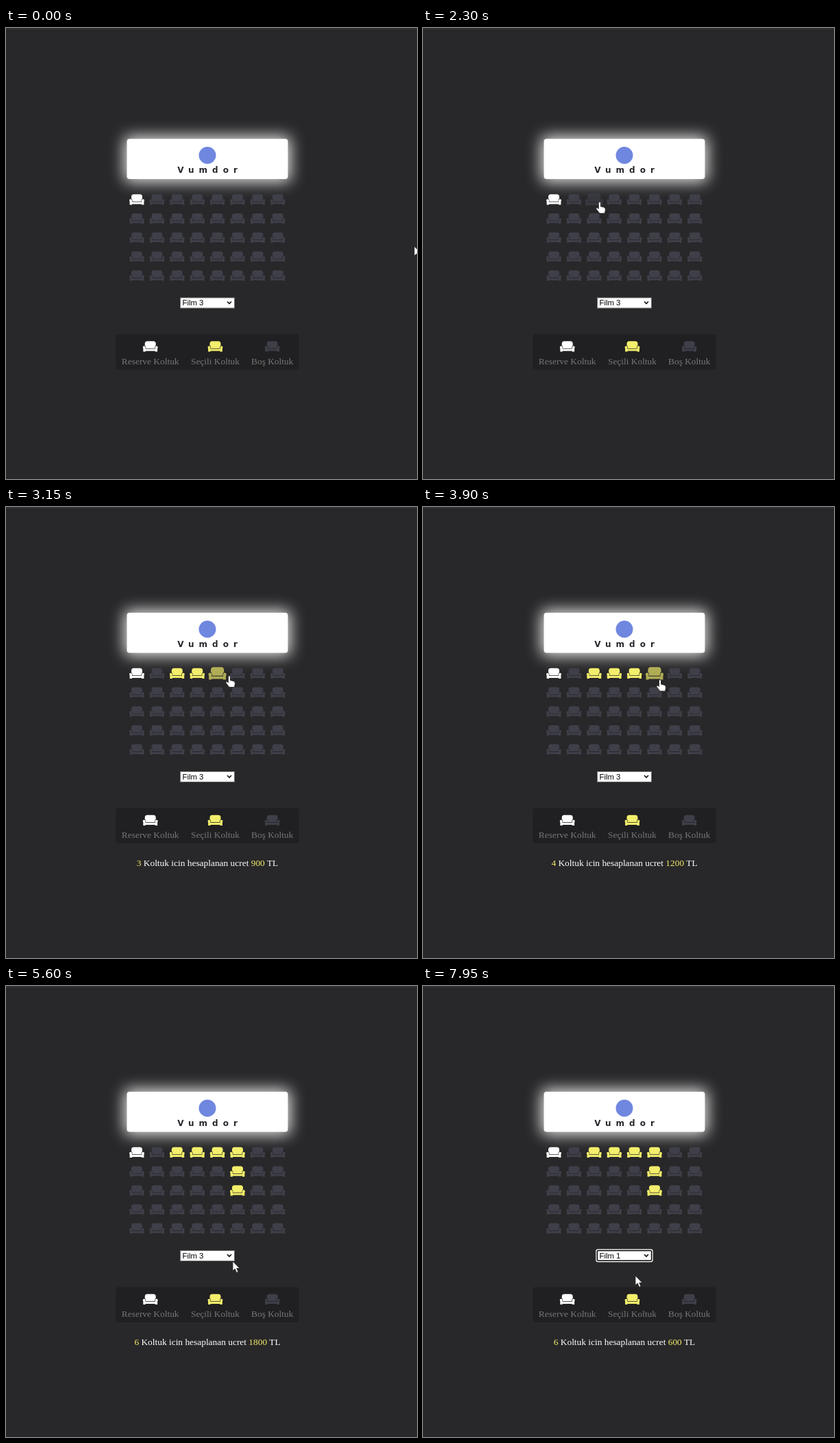
Animation, 600 px wide and 657 px high, one loop 8 s. Source, as an HTML page:

```html
<!DOCTYPE html>
<html lang="tr">
<head>
<meta charset="utf-8">
<style>
html, body { margin: 0; width: 100%; height: 100%; overflow: hidden; background: #282729; }
svg { display: block; }
.serif { font: 13.4px "Liberation Serif", serif; text-anchor: middle; }
.sans { font: 11.3px "Liberation Sans", sans-serif; }
.brand { font: bold 12px "DejaVu Sans", sans-serif; letter-spacing: 7px; text-anchor: middle; fill: #28272d; }
</style>
</head>
<body>
<svg width="600" height="657" viewBox="0 0 600 657">
  <defs>
    <filter id="glow" x="-30%" y="-100%" width="160%" height="300%"><feGaussianBlur stdDeviation="11"/></filter>
    <g id="seat">
      <path d="M3 6.5V4Q3 .3 6.5 .3H15.5Q19 .3 19 4V6.5Q17.6 7 17.6 9V10.8H4.4V9Q4.4 7 3 6.5Z"/>
      <path d="M0 9Q0 7.2 2 7.2T3.9 9V11.6H18.1V9Q18.1 7.2 20 7.2T22 9L21.4 11V15.5H18V14.6H4V15.5H.6V11Z"/>
    </g>
  </defs>
  <path d="M0 1.5H600" stroke="#38373a"/>
  <g id="page">
    <rect x="173" y="158" width="242" height="66" rx="6" fill="#fff" opacity=".9" filter="url(#glow)"/>
    <rect x="176.5" y="161.5" width="235" height="58.5" rx="4" fill="#fff"/>
    <circle cx="294" cy="185.5" r="12.5" fill="#7087e0"/>
    <text class="brand" x="297.5" y="211">Vumdor</text>
    <g id="seats"></g>
    <rect x="254.5" y="393" width="79" height="15" fill="#fff" stroke="#767676"/>
    <g id="focus" fill="none">
      <rect x="253" y="391.5" width="82" height="17.5" rx="2.5" stroke="#fff" stroke-width="1.5"/>
      <rect x="254.4" y="392.9" width="79.2" height="14.7" rx="1" stroke="#111" stroke-width="1.5"/>
    </g>
    <text id="film" class="sans" x="257.5" y="404"></text>
    <path d="M323 398.5L326 401.5L329 398.5" fill="none" stroke="#111" stroke-width="1.6"/>
    <rect x="160.5" y="446" width="267" height="51.5" rx="4" fill="#201f21"/>
    <g id="legend" class="serif"></g>
  </g>
  <text id="total" class="serif" x="294" y="522.5" fill="#fff"></text>
  <path id="cursor" fill="#fff" stroke="#222" stroke-width=".8"/>
</svg>
<script>
const $ = id => document.getElementById(id);
const LOOP = 8000, COLS = 8, ROWS = 5, DX = 29.4, DY = 27.7, SHIFT = 7.5;
const WHITE = '#fff', YELLOW = '#f3ee6b', EMPTY = '#3f3f49';
const ARROW = 'M0 0V14L3.2 11L5.6 16.5L8 15.5L5.7 10.3H10Z';
const HAND = 'M-1.5 1.5Q0-1 1.5 1.5V7L6 8Q9 9 8.5 12L7.5 17H0L-5 10.5Q-5 8-3 9L-1.5 10.5Z';

const center = i => [191 + i % COLS * DX, 250 + Math.floor(i / COLS) * DY];

// seat clicks: time, seat index
const clicks = [[2400, 2], [2700, 3], [3000, 4], [3550, 5], [4900, 13], [5250, 21]];

// the pointer reaches each seat shortly before clicking it
const seatStops = clicks.flatMap(([t, seat], i) => {
  const [x, y] = center(seat);
  const spot = [x + 8, y + 3 - (i ? SHIFT : 0)];
  return [[t - 150, ...spot], [t, ...spot]];
});
const stops = [
  [0, 596, 318], [250, 534, 310], [850, 534, 310],
  ...seatStops,
  [5600, 331, 401], [6000, 315, 394], [6950, 315, 394], [7700, 310, 422], [LOOP, 310, 422]
];

const seats = Array.from({ length: COLS * ROWS }, () => {
  const seat = document.createElementNS('http://www.w3.org/2000/svg', 'use');
  seat.setAttribute('href', '#seat');
  return $('seats').appendChild(seat);
});

const kinds = [['Reserve', 210.7, WHITE], ['Seçili', 305.5, YELLOW], ['Boş', 388.7, EMPTY]];
$('legend').innerHTML = kinds.map(([name, x, color]) =>
  `<use href="#seat" x="${x - 11}" y="456" fill="${color}"/>
   <text x="${x}" y="489.7" fill="#777">${name} Koltuk</text>`).join('');

function pointer(t) {
  const i = stops.findIndex(s => s[0] > t);
  const [t0, x0, y0] = stops[i - 1], [t1, x1, y1] = stops[i];
  const u = (t - t0) / (t1 - t0), k = u * u * (3 - 2 * u);
  return [x0 + (x1 - x0) * k, y0 + (y1 - y0) * k];
}

function seatAt(x, y) {
  const col = Math.floor((x - 180) / DX), row = Math.floor((y - 241) / DY);
  return col >= 0 && col < COLS && row >= 0 && row < ROWS ? row * COLS + col : -1;
}

function draw(now) {
  const t = now % LOOP;
  const chosen = clicks.filter(c => t >= c[0]).map(c => c[1]);
  const n = chosen.length, shift = n ? SHIFT : 0;
  const film = t < 6650 ? 3 : t < 7750 ? 2 : 1;
  const [x, y] = pointer(t);
  const hover = seatAt(x, y + shift);

  $('page').setAttribute('transform', `translate(0 ${-shift})`);
  seats.forEach((seat, i) => {
    const over = i === hover && i > 0;
    seat.setAttribute('transform', `translate(${center(i)}) scale(${over ? 1.2 : 1}) translate(-11 -8)`);
    seat.setAttribute('fill', i === 0 ? WHITE : chosen.includes(i) ? YELLOW : EMPTY);
    seat.setAttribute('opacity', over ? 0.67 : 1);
  });
  $('film').textContent = 'Film ' + film;
  $('focus').style.display = t >= 5950 ? '' : 'none';
  const mark = value => `<tspan fill="${YELLOW}">${value}</tspan>`;
  $('total').innerHTML = n ? `${mark(n)} Koltuk icin hesaplanan ucret ${mark(n * film * 100)} TL` : '';
  $('cursor').setAttribute('d', hover > 0 ? HAND : ARROW);
  $('cursor').setAttribute('transform', `translate(${x} ${y})`);
}

let start;
function tick(now) {
  start ??= now;
  draw(now - start);
  requestAnimationFrame(tick);
}
draw(0);
requestAnimationFrame(tick);
</script>
</body>
</html>
```
